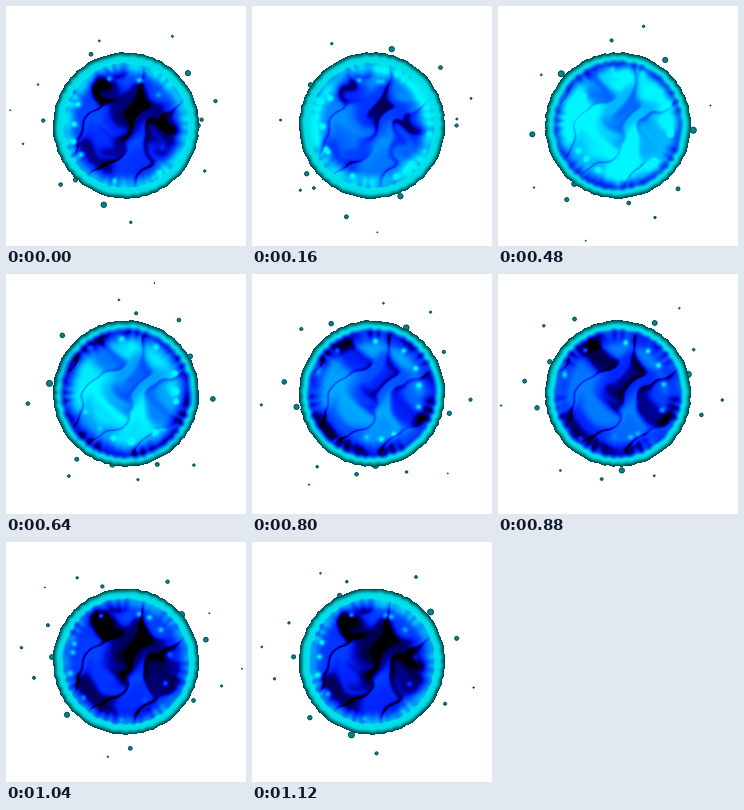
Animation, 240 px wide and 240 px high, one loop 1.2 s. Source, as an HTML page with a canvas:

```html
<!DOCTYPE html>
<html lang="en">
<head>
<meta charset="utf-8">
<title>Energy orb</title>
<style>
html, body { margin: 0; height: 100%; overflow: hidden; background: #fff; }
canvas { display: block; }
</style>
</head>
<body>
<canvas id="stage" width="240" height="240"></canvas>
<script>
const SIZE = 240, CX = 120, CY = 119.5, RADIUS = 73;
const STEPS = 15, STEP_MS = 80, TAU = Math.PI * 2;
const DROPS = 36, SPARKS = 13;
const ctx = document.getElementById('stage').getContext('2d', { willReadFrequently: true });

const clamp = v => Math.max(0, Math.min(1, v));
const smooth = (a, b, v) => { const k = clamp((v - a) / (b - a)); return k * k * (3 - 2 * k); };

let seed = 7;
const random = () => (seed = seed * 16807 % 2147483647) / 2147483647;

// Droplets leave the rim all around, spread evenly over the loop.
const drops = Array.from({ length: DROPS }, (_, i) => ({
  angle: i * 2.4 + random() * 0.5,
  start: i * STEPS / DROPS,
  speed: 4 + random() * 2.5,
  size: 2.3 + random() * 1.6
}));

function drawDrops(step) {
  ctx.fillStyle = '#00848c';
  ctx.strokeStyle = '#04484c';
  for (const { angle, start, speed, size } of drops) {
    const age = (step - start + STEPS) % STEPS;
    const r = size - age * 0.36;
    if (r < 0.9) continue;
    const dist = RADIUS - 1 + age * speed;
    ctx.beginPath();
    ctx.arc(CX + dist * Math.cos(angle), CY + dist * Math.sin(angle), r - 0.4, 0, TAU);
    ctx.fill();
    ctx.stroke();
  }
}

// Warped sine field: soft folds cut by thin dark filaments.
function swirl(x, y, w) {
  let u = x / 11, v = y / 11;
  for (let i = 1; i < 5; i++) {
    const du = Math.sin(v * 1.2 + i * 1.9 + 0.3 * Math.sin(w + i));
    const dv = Math.cos(u * 1.3 - i * 2.3 + 0.3 * Math.cos(w - i));
    u += du * 0.8;
    v += dv * 0.8;
  }
  const ridge = Math.sin(u * 0.8 + v * 0.5) / 0.28;
  return 0.11 * Math.sin(v * 0.8 - u * 0.5) + 0.03 - 0.2 * Math.exp(-ridge * ridge);
}

function makeSparks(t) {
  return Array.from({ length: SPARKS }, (_, i) => {
    const angle = i * 2.4 + 0.2 * Math.sin(TAU * t + i);
    const phase = (t + i * 0.37) % 1;
    const r = 60 - 18 * phase;
    return { x: r * Math.cos(angle), y: r * Math.sin(angle), glow: 0.45 * Math.sin(Math.PI * phase) };
  });
}

function drawOrb(t) {
  const image = ctx.getImageData(0, 0, SIZE, SIZE), px = image.data;
  const w = TAU * t, sparks = makeSparks(t);
  for (let py = 44; py < 196; py++) {
    for (let qx = 44; qx < 196; qx++) {
      const x = qx + 0.5 - CX, y = py + 0.5 - CY, angle = Math.atan2(y, x);
      const edge = RADIUS + 0.4 * Math.sin(angle * 31 + 4 * Math.sin(angle * 5 + w));
      const depth = edge - Math.hypot(x, y);
      if (depth < 0) continue;

      // Brightness pulses at the rim first, then travels to the middle.
      const peak = 0.05 + 0.37 * smooth(7, 28, depth);
      const inside = smooth(6, 18, depth);
      const streak = Math.sin(angle * 19 + 4 * Math.sin(angle * 7 + w));
      let level = 0.55 + 0.26 * Math.cos(TAU * (t - peak));
      level += swirl(x, y, w) * inside;
      level += 0.07 * streak * (1 - smooth(10, 26, depth));
      level += 0.6 * (1 - smooth(5, 12, depth));
      for (const s of sparks) {
        const d2 = (x - s.x) ** 2 + (y - s.y) ** 2;
        if (d2 < 60) level += s.glow * Math.exp(-d2 / 7);
      }

      const shade = 0.25 + 0.65 * smooth(-1, 6, depth) + 0.1 * inside;
      const at = (py * SIZE + qx) * 4;
      px[at] = 0;
      px[at + 1] = 245 * shade * clamp((level - 0.28) / 0.6);
      px[at + 2] = 255 * shade * clamp((level - 0.14) / 0.22);
      px[at + 3] = 255;
    }
  }
  ctx.putImageData(image, 0, 0);
}

let shown = -1;
function tick() {
  const step = Math.floor(performance.now() / STEP_MS) % STEPS;
  if (step !== shown) {
    shown = step;
    ctx.fillStyle = '#fff';
    ctx.fillRect(0, 0, SIZE, SIZE);
    drawDrops(step);
    drawOrb(step / STEPS);
  }
  requestAnimationFrame(tick);
}
tick();
</script>
</body>
</html>
```
